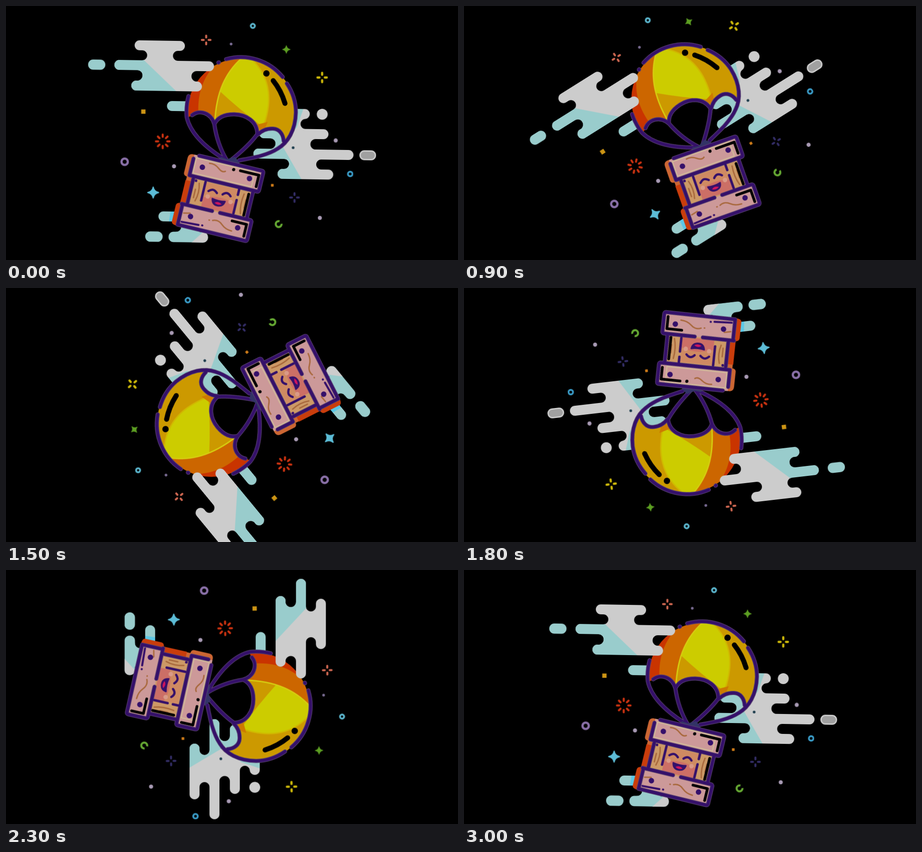
Recreate the animation shown at these times as an HTML page. Size 998 px wide and 561 px high, loop 3100 ms.

```html
<!DOCTYPE html>
<html lang="en">
<head>
<meta charset="utf-8">
<title>Parachute crate</title>
<style>
  html, body { margin: 0; width: 100%; height: 100%; overflow: hidden; background: #000; }
  svg { display: block; width: 100vw; height: 100vh; }

  .spin { animation: spin 3100ms steps(1, end) infinite; }

  /* One pose per 100 ms: steps(n) spreads n poses over a segment. */
  @keyframes spin {
    0%, 12.9% { transform: translate(499px, 281px) rotate(.9deg); }
    16.12% { transform: translate(498.8px, 280px) rotate(-.6deg); }
    19.35% { transform: translate(498px, 276px) rotate(-4.6deg); }
    22.58% { transform: translate(497px, 270px) rotate(-10.6deg); }
    25.8%  { transform: translate(496px, 262px) rotate(-19.1deg); }
    29.03% { transform: translate(496.3px, 255.3px) rotate(-32.1deg); }
    32.25% { transform: translate(494px, 254px) rotate(-48.1deg); animation-timing-function: steps(3, end); }
    41.93% { transform: translate(481.2px, 282.3px) rotate(-91.5deg); animation-timing-function: steps(2, end); }
    48.38% { transform: translate(502px, 284px) rotate(-129.5deg); animation-timing-function: steps(3, end); }
    58.06% { transform: translate(506.2px, 285.2px) rotate(-186.6deg); animation-timing-function: steps(2, end); }
    64.51% { transform: translate(507.5px, 284px) rotate(-222.1deg); animation-timing-function: steps(3, end); }
    74.19% { transform: translate(504.3px, 281.5px) rotate(-270deg); animation-timing-function: steps(3, end); }
    83.87% { transform: translate(505.3px, 281.4px) rotate(-309.3deg); animation-timing-function: steps(2, end); }
    90.32% { transform: translate(505.5px, 281.4px) rotate(-341.1deg); animation-timing-function: steps(2, end); }
    96.77%, 100% { transform: translate(505.7px, 281.5px) rotate(-359deg); }
  }

  .line { fill: none; stroke: #35106a; stroke-width: 6.5; stroke-linecap: round; stroke-linejoin: round; }
  .halo { stroke: #57406f; stroke-width: 9; }
  .shine { fill: none; stroke: #000; stroke-linecap: round; stroke-linejoin: round; }
  .grain { fill: none; stroke: #a8683c; stroke-width: 3; stroke-linecap: round; }
  .blue { fill: #9cc; }
  .gray { fill: #ccc; }
</style>
</head>
<body>
<svg viewBox="0 0 998 561" preserveAspectRatio="none">
  <defs>
    <clipPath id="frame"><rect x="-319.5" y="-244.5" width="639.5" height="487"/></clipPath>

    <path id="cloudL" d="M-207-202H-118a11 11 0 0 1 0 22H-122a11 11 0 0 0 0 22H-53a11 11 0 0 1 0 22
      H-80a11.5 11.5 0 0 0 0 23H-79a11 11 0 0 1 0 22H-213a11 11 0 0 1 0-22H-211a11.5 11.5 0 0 0 0-23
      H-251a11 11 0 0 1 0-22H-201a11 11 0 0 0 0-22H-207a11 11 0 0 1 0-22Z"/>
    <path id="cloudR" d="M100-56H160a11 11 0 0 1 0 22H162a11 11 0 0 0 0 22H202a11 11 0 0 1 0 22
      H185a11.5 11.5 0 0 0 0 23H258a11 11 0 0 1 0 22H198a11 11 0 0 0 0 22H214a11 11 0 0 1 0 22
      H113a11 11 0 0 1 0-22H116a11 11 0 0 0 0-22H59a11 11 0 0 1 0-22H85a11.5 11.5 0 0 0 0-23
      H71a11 11 0 0 1 0-22H100Z"/>
    <clipPath id="inL"><use href="#cloudL"/></clipPath>
    <clipPath id="inR"><use href="#cloudR"/></clipPath>
    <clipPath id="inTail"><rect x="-136.5" y="219.5" width="87" height="23" rx="11"/></clipPath>

    <path id="dome" d="M401 246A119.500 119.500 0 1 1 630 282L613 298C612 283 606 272 590 271C576 270 564 276 556 284
      C553 255 530 239 503 239C486 239 468 244 460 261C452 240 432 229 412 242Z"/>
    <clipPath id="inDome"><use href="#dome"/></clipPath>

    <path id="ropes" d="M486 117.500A120 120 0 0 1 611 157M469 125l1-.5
      M620 171C634 192 640 213 640 235C639 275 622 302 600 315C579 329 548 335 515 341
      M403 199Q397 222 399 245C407 283 445 315 480 337
      M411 241C428 228 453 236 460 261Q466 304 487 340
      M460 261C468 244 486 239 503 239C530 239 555 255 555 283Q536 309 496 341
      M556 284C564 276 576 270 590 271C604 272 612 283 613 298"/>
    <path id="frameLines" d="M-66-79H76Q80-79 80-75V-36Q80-32 76-32H-77V-70
      M68-28V28M-79 33H-10M8 33H76Q80 33 80 37V76Q80 80 76 80H-77V36M-67-26V28"/>

    <path id="plus" d="M0-5.500V-9.500M0 5.500V9.500M-5.500 0H-9.500M5.500 0H9.500" fill="none" stroke-width="4.500" stroke-linecap="round"/>
    <path id="star" d="M0-12Q2-2 12 0Q2 2 0 12Q-2 2-12 0Q-2-2 0-12Z" stroke-width="2.500" stroke-linejoin="round"/>
    <path id="rays" d="M0-10V-15M0 10V15M-10 0H-15M10 0H15" fill="none" stroke="#cc3311" stroke-width="4.500" stroke-linecap="round"/>
  </defs>

  <g class="spin"><g clip-path="url(#frame)">

    <!-- clouds behind -->
    <use href="#cloudR" class="gray"/>
    <path class="blue" clip-path="url(#inR)" d="M40-60H158L143-15L108 20L155 99H40Z"/>
    <circle class="gray" cx="198.500" cy="-45" r="12"/>
    <rect x="283.500" y="34.500" width="34" height="19" rx="9.500" fill="#a0a0a0" stroke="#ccc" stroke-width="3"/>
    <g class="blue">
      <rect x="-144.500" y="-69" width="56" height="22" rx="11"/>
      <rect x="-159.500" y="175" width="64" height="22" rx="11"/>
      <path d="M-122 197Q-109 198-109 208Q-109 219-122 220H-68V190H-122Z"/>
      <rect x="-136.500" y="219.500" width="87" height="23" rx="11"/>
      <rect x="-188" y="219.500" width="38.500" height="23" rx="11.500"/>
    </g>
    <path class="gray" clip-path="url(#inTail)" d="M-88 245L-48 208V245Z"/>
    <path d="M-133 175h10v22h-13Z" fill="#5cc8e6"/>

    <g transform="rotate(-.9) translate(-499 -281)">
      <!-- balloon -->
      <g clip-path="url(#inDome)">
        <rect x="390" y="100" width="260" height="210" fill="#c93400"/>
        <path d="M468 122C432 160 422 195 425 245L470 300H650V100Z" fill="#cc6600"/>
        <path d="M524 112C485 145 464 190 461 262L500 300H650V100Z" fill="#cc9900"/>
        <path d="M524 112C498 134 481 160 472 188Q516 229 566 266C589 215 588 158 537 112Z" fill="#cccc00"/>
        <path d="M524 112C485 145 464 190 461 258" fill="none" stroke="#d6cc10" stroke-width="3"/>
        <path d="M537 112C588 158 590 215 563 280" fill="none" stroke="#d0b800" stroke-width="3"/>
        <path d="M554 262L578 256L566 284Z" fill="#cc7a00"/>
      </g>
      <use href="#ropes" class="line halo"/>
      <use href="#ropes" class="line"/>
      <circle cx="575" cy="149" r="7"/>
      <path class="shine" stroke-width="11" d="M590 165Q607 186 616 215"/>
      <path d="M470 346L474 333L488 338L506 333L516 347L492 349Z" fill="#333366"/>

      <!-- crate -->
      <g transform="translate(472.500 423) rotate(13.500)">
        <path d="M-70-79H-82Q-90-77-90-69V-34Q-89-28-82-28V30H-64L-60-30Z" fill="#cc6633"/>
        <path d="M-83-20V32Q-91 33-91 40V77Q-89 83-77 83V30H-64V-20Z" fill="#c93d0c"/>
        <rect x="-70" y="-32" width="138" height="66" fill="#cc9966"/>
        <rect x="-36" y="-26" width="70" height="56" fill="#cf8a62"/>
        <path d="M-36 8Q0-6 34 6V30H-36Z" fill="#cc6f66"/>
        <path d="M-77-79H80V-32H-77ZM-77 33H80V80H-77Z" fill="#cc9999"/>
        <path d="M-71-73H62V-39H-71Z" fill="none" stroke="#d0b999" stroke-width="2.500"/>
        <path class="grain" d="M-52-20Q-46 0-52 20M50-20Q46 4 52 24M-57-5V14M57-8V10"/>
        <path class="grain" d="M-40-68Q-28-70-18-62T-2-59M-4 53Q8 48 18 57T42 66M-12 54h1M-70 52l14-3"/>
        <path class="shine" stroke-width="6" d="M30-68H72V-42M38 44H71V71M60-22V26"/>
        <circle cx="15" cy="-67" r="3.500"/>
        <use href="#frameLines" class="line halo"/>
        <use href="#frameLines" class="line"/>
        <path class="line" style="stroke-width:5.500" d="M-39-26V16M37-27V-15M37-3V27M-60-24v.5"/>
        <path class="line" style="stroke-width:4.500" d="M-70 72L-32 70M-24 69h.5"/>
        <g fill="#35106a">
          <circle cx="-53.500" cy="-56" r="6"/><circle cx="53.500" cy="-56" r="6"/>
          <circle cx="-53.500" cy="56" r="6"/><circle cx="53.500" cy="56" r="6"/>
        </g>
        <circle cx="25" cy="4" r="5" fill="#d99a88"/><circle cx="-27" cy="4" r="5" fill="#d99a88"/>
        <path class="line" style="stroke-width:5" d="M-28-8Q-19-18-9-8M4-8Q13-18 22-8"/>
        <path d="M-16 6Q-2 9 13 6Q11 19-2 19Q-14 19-16 6Z" fill="#35106a" stroke="#35106a" stroke-width="3" stroke-linejoin="round"/>
        <path d="M-9 14Q-2 8 7 14Q-1 19-9 14Z" fill="#d0145e"/>
      </g>
    </g>

    <!-- cloud in front -->
    <use href="#cloudL" class="gray"/>
    <path class="blue" clip-path="url(#inL)" d="M-232-191L-115-82H-340V-191Z"/>
    <rect class="blue" x="-320" y="-158" width="38" height="22.500" rx="11"/>

    <!-- sparks -->
    <g transform="rotate(-.9) translate(-499 -281)">
      <use href="#plus" x="442" y="75" stroke="#cc6650"/>
      <use href="#plus" transform="translate(698 158) scale(1.08)" stroke="#ccb80a"/>
      <use href="#plus" x="637" y="423" stroke="#332d66"/>
      <use href="#star" transform="translate(619 96) scale(.68)" fill="#5c9e22" stroke="#5c9e22"/>
      <use href="#star" x="325" y="412" fill="#5cbcd6" stroke="#5cbcd6"/>
      <use href="#rays" x="346" y="299"/>
      <use href="#rays" transform="translate(346 299) rotate(45)"/>
      <g fill="none" stroke-width="4">
        <circle cx="545" cy="44" r="4.500" stroke="#5cb8d0"/>
        <circle cx="760" cy="371" r="5" stroke="#3a9cc8"/>
        <circle cx="262" cy="344" r="7" stroke="#8a70a8" stroke-width="5"/>
        <path d="M604 475.500A6.500 6.500 0 1 0 608.500 481" stroke="#66aa33" stroke-width="4.500"/>
      </g>
      <rect x="298.500" y="228.500" width="9.500" height="9.500" fill="#cc9414"/>
      <rect x="585" y="393" width="6" height="6" rx="1" fill="#cc7a18"/>
      <g fill="#a89ab4">
        <circle cx="371" cy="354" r="4.500"/>
        <circle cx="728" cy="297" r="4.500"/>
        <circle cx="693" cy="468" r="4.500"/>
        <circle cx="497" cy="84" r="3" fill="#776a90"/>
        <circle cx="634" cy="313" r="3" fill="#1c3c4c"/>
      </g>
    </g>
  </g></g>
</svg>
</body>
</html>
```
